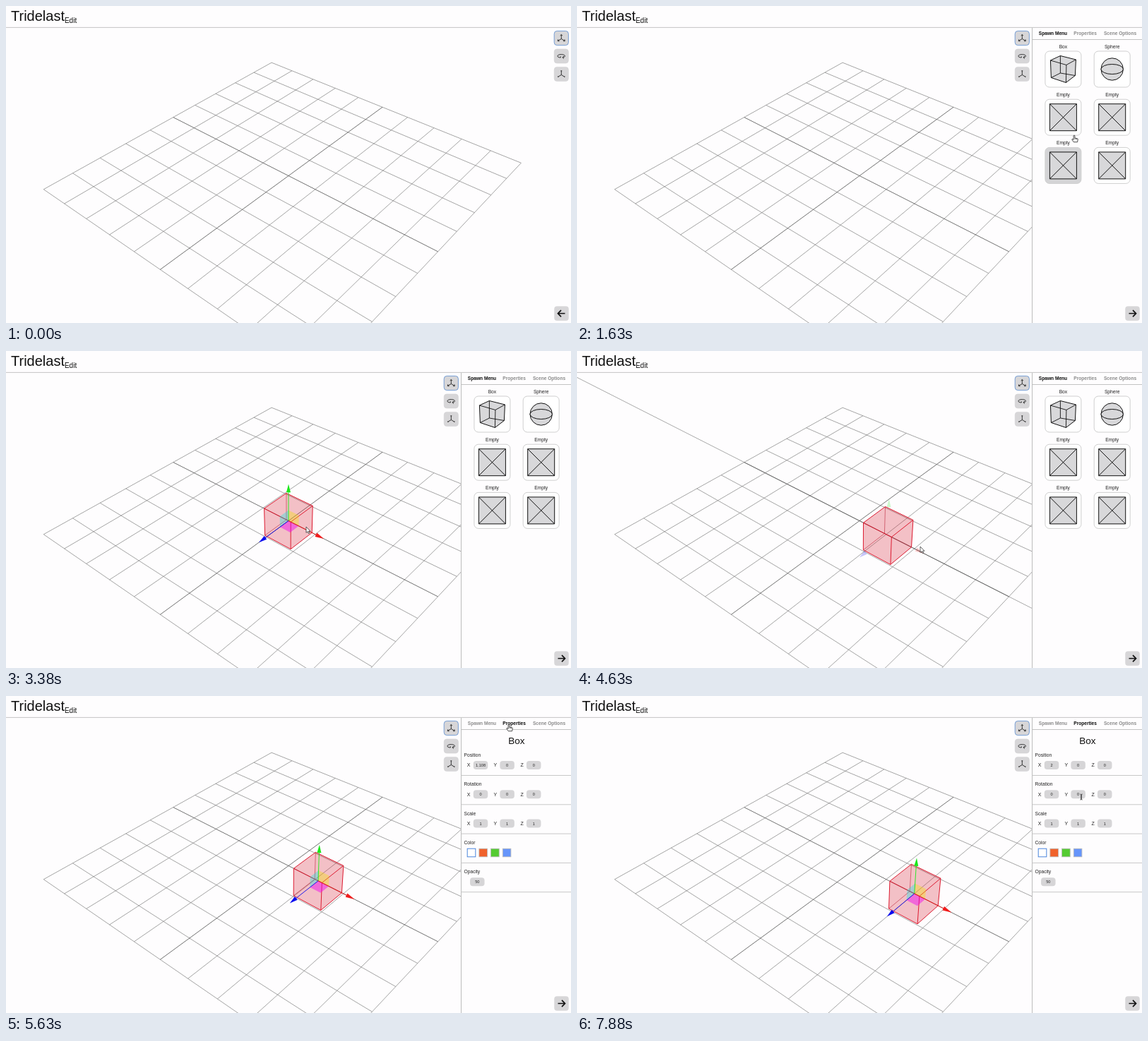
Write an HTML page that moves like this. It is 800 by 449 pixels and loops after 8 s.

```html
<!DOCTYPE html>
<html lang="en">
<head>
<meta charset="utf-8">
<title>TridelastEdit</title>
<style>
html, body { margin: 0; width: 100%; height: 100%; overflow: hidden; background: #fefdfe; }
svg { display: block; width: 100vw; height: 100vh; font-family: "Liberation Sans", Arial, sans-serif; }
</style>
</head>
<body>
<svg id="stage" viewBox="0 0 800 449" preserveAspectRatio="none">
  <rect width="800" height="449" fill="#fefdfe"/>
  <g id="grid" fill="none"></g>
  <g id="scene" fill="none" stroke-linejoin="round"></g>
  <rect width="800" height="30" fill="#fefdfe"/>
  <path d="M0 30.4H800" stroke="#c4c4c4"/>
  <text x="7" y="21" font-size="20" fill="#111">Tridelast<tspan font-size="10" dy="3">Edit</tspan></text>
  <g id="tools"></g>
  <g id="panel"></g>
  <g id="toggle"></g>
  <g id="cursor"></g>
</svg>
<script>
const LOOP = 8000, STEP = 125, PANEL = 156, FOCAL = 945;
const EYE = [10, 12, 12], CENTER = [400, 240.5];
const $ = id => document.getElementById(id);
const dot = (a, b) => a[0] * b[0] + a[1] * b[1] + a[2] * b[2];
const clamp = v => Math.max(0, Math.min(1, v));

// Camera basis looking at the origin
const dist = Math.hypot(...EYE), flat = Math.hypot(EYE[0], EYE[2]);
const back = EYE.map(v => v / dist);
const right = [EYE[2] / flat, 0, -EYE[0] / flat];
const up = [back[1] * right[2], flat / dist, -back[1] * right[0]];

const depth = p => dist - dot(p, back);
const project = p => {
  const k = FOCAL / depth(p);
  return [CENTER[0] + dot(p, right) * k, CENTER[1] - dot(p, up) * k];
};
const points = list => list.map(p => project(p).map(v => v.toFixed(2)).join(" ")).join("L");
const poly = (list, attrs) => `<path d="M${points(list)}" ${attrs}/>`;
const text = (x, y, size, str, attrs = "") =>
  `<text x="${x}" y="${y}" font-size="${size}" text-anchor="middle" ${attrs}>${str}</text>`;
const box = (x, y, w, h, r, attrs) =>
  `<rect x="${x - w / 2}" y="${y - h / 2}" width="${w}" height="${h}" rx="${r}" ${attrs}/>`;

function lerpKeys(keys, t) {
  let i = 0;
  while (i < keys.length - 1 && keys[i + 1][0] <= t) i++;
  const a = keys[i], b = keys[i + 1] || a;
  const u = b === a ? 0 : clamp((t - a[0]) / (b[0] - a[0]));
  return a.slice(1).map((v, n) => v + (b[n + 1] - v) * u);
}

// CSS "ease" curve
function ease(x) {
  let lo = 0, hi = 1;
  for (let i = 0; i < 24; i++) {
    const s = (lo + hi) / 2;
    const bx = 0.75 * s * (1 - s) ** 2 + 0.75 * s * s * (1 - s) + s ** 3;
    if (bx < x) lo = s; else hi = s;
  }
  return 0.3 * lo * (1 - lo) ** 2 + 3 * lo * lo * (1 - lo) + lo ** 3;
}

function drawGrid() {
  let thin = "", dark = "";
  for (let i = -5; i <= 5; i++) {
    const d = "M" + points([[i, 0, -5], [i, 0, 5]]) + "M" + points([[-5, 0, i], [5, 0, i]]);
    if (i) thin += d; else dark += d;
  }
  return `<path d="${thin}" stroke="#7e7e7e" stroke-width=".7"/><path d="${dark}" stroke="#444" stroke-width=".75"/>`;
}

function drawCube(x) {
  const v = (a, b, c) => [x + a / 2, b / 2, c / 2];
  const outline = [v(-1, 1, -1), v(1, 1, -1), v(1, -1, -1), v(1, -1, 1), v(-1, -1, 1), v(-1, 1, 1)];
  const hub = (s) => {
    const c = v(s, s, s);
    return [v(-s, s, s), v(s, -s, s), v(s, s, -s)].map(p => "M" + points([c, p])).join("");
  };
  return poly([...outline, outline[0]], `fill="#d21c2c" fill-opacity=".27"`) +
    `<path d="${hub(-1)}" stroke="#b81a30" stroke-width=".8" opacity=".7"/>` +
    poly([...outline, outline[0]], `stroke="#dd1a30"`) +
    `<path d="${hub(1)}" stroke="#dd1a30"/>`;
}

function drawGizmo(x, dragging) {
  const s = 1.3 * depth([x, 0, 0]) / dist;
  const at = (a, b, c) => [x + a * s, b * s, c * s];
  const plane = (f, color, alpha) =>
    poly([f(0, 0), f(.3, 0), f(.3, .3), f(0, .3)], `fill="${color}" fill-opacity="${alpha}"`);
  const arrow = (f, color) => {
    const [bx, by] = project(f(.79)), [tx, ty] = project(f(1.01));
    const n = Math.hypot(tx - bx, ty - by), wx = (by - ty) / n * 3, wy = (tx - bx) / n * 3;
    return (dragging ? "" : poly([f(0), f(.8)], `stroke="${color}" stroke-width=".9"`)) +
      `<path d="M${tx} ${ty}L${bx + wx} ${by + wy}L${bx - wx} ${by - wy}Z" fill="${color}"/>`;
  };
  const planes = dragging ? "" :
    plane((a, b) => at(0, a, b), "#00e5e5", .32) +
    plane((a, b) => at(a, b, 0), "#f5e000", .36) +
    plane((a, b) => at(a, 0, b), "#f000f0", .46);
  return `<g opacity="${dragging ? .22 : 1}">${planes}` +
    arrow(k => at(0, k, 0), "#1be81b") + arrow(k => at(0, 0, k), "#0a0af0") +
    arrow(k => at(k, 0, 0), "#f01c1c") + "</g>";
}

function drawTools() {
  const icons = [
    "M0 1V-5M-1.6 -3.4L0 -5L1.6 -3.4M0 1L-5 4M-4.6 1.8L-5 4L-2.8 4.3M0 1L5 4M4.6 1.8L5 4L2.8 4.3",
    "M-1 2C-7 2 -7 -2.4 0 -2.4C6.5 -2.4 6.5 1.6 2 1.8M3.8 .2L1.6 1.8L3.6 3.6M-1 2V.4",
    "M0 1V-5M0 1L-5 4M0 1L5 4M-1 -4.6H1M-4.9 3L-4 4.4M4.9 3L4 4.4"
  ];
  return icons.map((d, i) => {
    const x = 786.3, y = 45.5 + i * 25.5;
    return box(x, y, 20.2, 20.2, 4, `fill="#d7d6d8" stroke="${i ? "#cdccce" : "#5a8cd0"}" stroke-width="${i ? .5 : .8}"`) +
      `<path transform="translate(${x} ${y})" d="${d}" fill="none" stroke="#222" stroke-width=".9"/>`;
  }).join("");
}

function drawTabs(active) {
  return [["Spawn Menu", 674], ["Properties", 719.6], ["Scene Options", 769]].map(([name, x], i) =>
    text(x, 41, 6.6, name, `font-weight="bold" fill="${i === active ? "#0a0a0a" : "#8b8b8b"}"`)).join("") +
    `<path d="M644 47.5H800" stroke="#bdbdbd" stroke-width=".9"/>`;
}

function drawSpawn(hover) {
  const ink = `fill="#d8d8da" stroke="#111" stroke-width="1"`;
  const icons = {
    Box: `<path d="M-18 -12.5L-4 -19L18 -13.5L17 9L4 19L-17 12Z" ${ink}/>` +
      `<path d="M-18 -12.5L4.5 -6L18 -13.5M4.5 -6L4 19M-4 -19V5.5L-17 12M-4 5.5L17 9" fill="none" stroke="#111" stroke-width=".9"/>`,
    Sphere: `<circle r="15.7" ${ink}/><ellipse rx="15.7" ry="7" ${ink}/>`,
    Empty: `<path d="M-19 -19H19V19H-19ZL19 19M19 -19L-19 19" ${ink}/>`
  };
  return ["Box", "Sphere", "Empty", "Empty", "Empty", "Empty"].map((name, i) => {
    const x = 688.4 + i % 2 * 69.3, y = 89.5 + (i >> 1) * 68.2;
    return text(x, y - 29.5, 6.7, name, `fill="#222"`) +
      box(x, y, 51, 51, 6, `fill="${i === hover ? "#d4d4d6" : "#fff"}" stroke="#cfcfcf"`) +
      `<g transform="translate(${x} ${y})">${icons[name]}</g>`;
  }).join("");
}

function drawProps(x) {
  const pitch = 41.3;
  const field = (cx, cy, value) => box(cx, cy, 20.5, 12, 4, `fill="#d6d5d7"`) +
    text(cx, cy + 2, 5.6, value, `fill="#222"`);
  let out = text(722.8, 68, 13.5, "Box", `fill="#111"`);
  ["Position", "Rotation", "Scale", "Color", "Opacity"].forEach((name, i) => {
    const y = 86 + i * pitch;
    out += `<text x="648.5" y="${y}" font-size="6.7" fill="#222">${name}</text>` +
      `<path d="M644 ${112.5 + i * pitch}H800" stroke="#c2c2c2" stroke-width=".9"/>`;
    if (i > 2) return;
    ["X", "Y", "Z"].forEach((axis, n) => {
      const value = i === 2 ? 1 : i || n ? 0 : x;
      out += text(655 + n * 37.8, y + 14.3, 7, axis, `fill="#222"`) + field(672 + n * 37.6, y + 12, value);
    });
  });
  ["#fff", "#f0622c", "#55cb32", "#6695fa"].forEach((color, i) => {
    out += box(659 + i * 16.7, 222, 11.6, 11.6, 0, `fill="${color}" stroke="${i ? "#b9b9b9" : "#4b86dc"}" stroke-width="${i ? .8 : 1}"`);
  });
  return out + field(667.3, 263.3, 50);
}

const pointers = {
  arrow: `<path d="M0 0V8.4L2 6.7L3.4 9.6L4.7 9L3.4 6.2H6Z" fill="#fff" stroke="#222" stroke-width=".7"/>`,
  hand: `<path d="M-.9 .6Q0 -.6 .9 .6V4L4.6 4.8Q5.3 5 5.2 6L4.6 9.7H-.8L-3.2 6.2Q-3.2 5 -1.9 5.6L-.9 6.5Z" fill="#fff" stroke="#222" stroke-width=".8"/><path d="M.9 4V6M2.3 4.5V6.2M3.6 4.7V6.3" stroke="#222" stroke-width=".5"/>`,
  beam: `<path d="M-1.6 0Q0 0 0 1V7Q0 8 -1.6 8M1.6 0Q0 0 0 1V7Q0 8 1.6 8" fill="none" stroke="#222" stroke-width=".8"/>`
};
const trail = [
  [125, 764, 440], [375, 792, 437], [1500, 792, 437], [1625, 704, 183], [2000, 690, 98],
  [2625, 690, 98], [3125, 397, 263], [3250, 397, 263], [3375, 425, 249], [3625, 425, 249],
  [4625, 486, 277], [4875, 488, 278], [5375, 712, 40], [5750, 712, 40], [6250, 738, 93],
  [6375, 668, 93], [6750, 668, 93], [7375, 688, 81], [7750, 688, 81], [7875, 714, 139]
];
const kinds = [
  [0, "arrow"], [375, "hand"], [2750, "arrow"], [5375, "hand"], [5875, "arrow"],
  [6250, "beam"], [7000, "arrow"], [7875, "beam"]
];
const hovers = [[0, -1], [1625, 4], [1750, 2], [2000, 0], [2750, -1]];
const slide = [[3625, 0], [4625, 1.06], [4750, 1.108], [6750, 1.108], [6875, 2]];
const held = (keys, t) => keys.filter(k => k[0] <= t).pop()[1];

function update(ms) {
  // The screen refreshes eight times a second
  const t = Math.floor(ms / STEP) * STEP;
  const open = clamp((t - 767) / 480);
  const shift = PANEL * ease(open * .96 + (open === 1 ? .04 : 0));
  const x = lerpKeys(slide, t)[0];
  const dragging = t >= 3750 && t < 4875;

  $("scene").innerHTML = t < 2375 ? "" :
    (dragging ? poly([[-30, 0, 0], [8, 0, 0]], `stroke="#555" stroke-width=".5"`) : "") +
    drawCube(x) + (t < 2750 ? "" : drawGizmo(x, dragging));

  $("tools").setAttribute("transform", `translate(${-shift} 0)`);
  $("panel").setAttribute("transform", `translate(${PANEL - shift} 0)`);
  $("panel").style.display = open ? "" : "none";
  const props = t >= 5500;
  $("panel").innerHTML = `<path d="M644.5 31H801V450H644.5Z" fill="#fefdfe"/>` +
    `<path d="M644.5 31V449" stroke="#bdbdbd"/>` + drawTabs(props ? 1 : 0) +
    (props ? drawProps(+x.toFixed(3)) : drawSpawn(held(hovers, t)));

  $("toggle").innerHTML = box(786.5, 435.5, 20.5, 20.5, 4, `fill="#d7d6d8"`) +
    `<path transform="translate(786.5 435.5) rotate(${180 * open})" d="M5 0H-5M-.5 -4.6L-5 0L-.5 4.6" fill="none" stroke="#111" stroke-width="1.7"/>`;

  const [cx, cy] = lerpKeys(trail, t);
  $("cursor").innerHTML = t < 125 ? "" : pointers[held(kinds, t)];
  $("cursor").setAttribute("transform", `translate(${cx} ${cy})`);
}

$("grid").innerHTML = drawGrid();
$("tools").innerHTML = drawTools();
const start = performance.now();
function tick() {
  update((performance.now() - start) % LOOP);
  requestAnimationFrame(tick);
}
tick();
</script>
</body>
</html>
```
